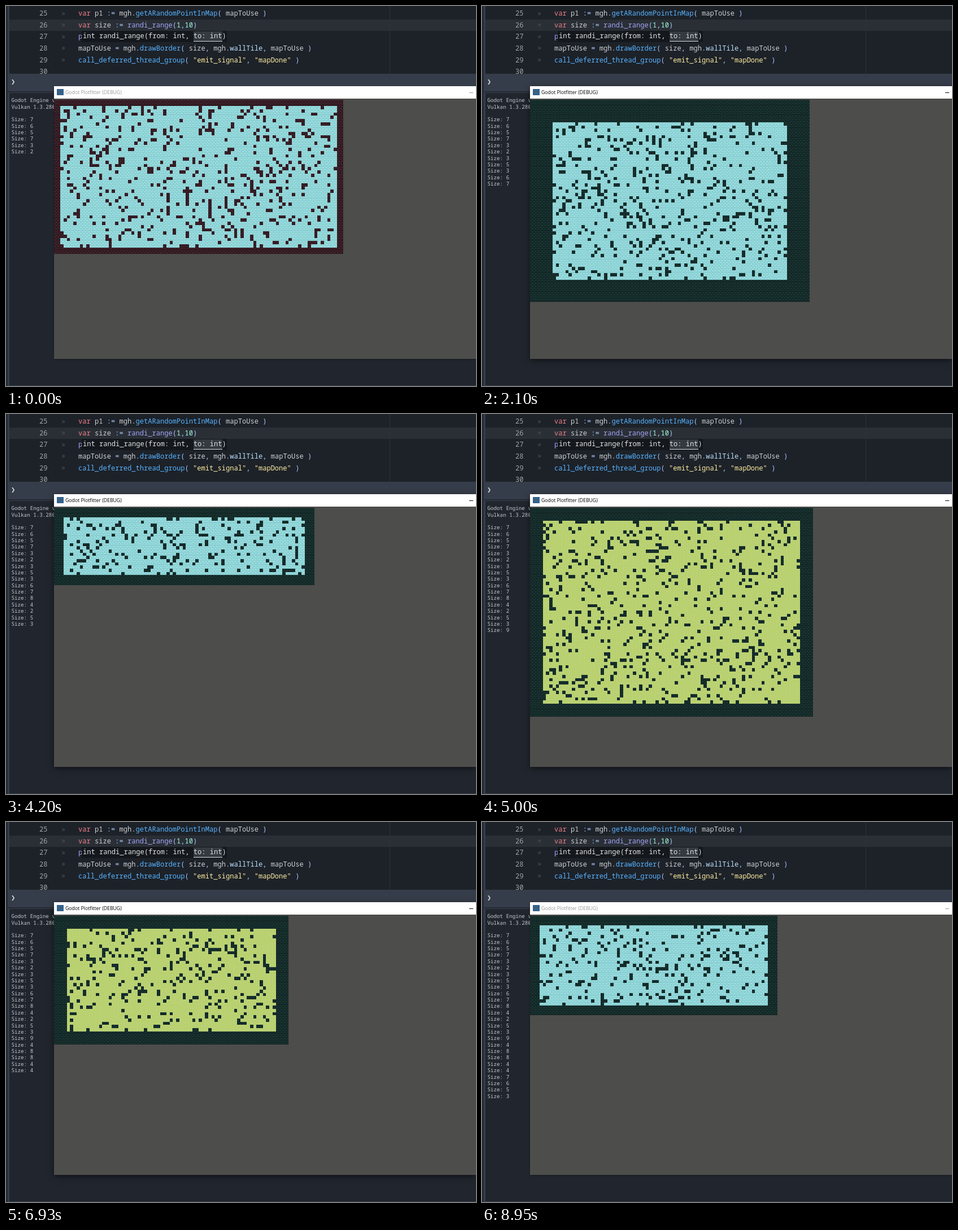
These frames come from a looping animation (832x673 px, 9060 ms). An HTML page with a canvas:

```html
<!DOCTYPE html>
<html lang="en">
<head>
<meta charset="utf-8">
<title>Random map borders</title>
<style>
html, body { margin: 0; width: 100%; height: 100%; overflow: hidden; background: #363d4a; }
#stage { position: relative; width: 832px; height: 673px; overflow: hidden; }
#stage * { position: absolute; margin: 0; }
#stage span { position: static; }
pre { font: 12.08px/20.6px "Noto Sans Mono", "DejaVu Sans Mono", monospace; color: #cdcfd2; white-space: pre; }
#rail { left: 0; top: 0; width: 3px; height: 673px; background: #252a33; }
#editor { left: 6px; top: 0; width: 826px; height: 120px; overflow: hidden; background: #1d2229; }
#current { left: 0; top: 24px; width: 826px; height: 20px; background: #2a2f36; }
#guide { left: 673px; top: 0; width: 1px; height: 120px; background: #2d323a; }
#numbers { left: 53px; top: 3.2px; color: #9fa3a8; }
#tabs { left: 92px; top: 2.5px; color: #4c525b; }
#code { left: 122px; top: 3.2px; }
#hint { left: 128px; top: 44px; width: 257px; height: 20px; background: #14181c; }
#hint i { left: 198px; top: 1px; width: 51px; height: 17px; background: #343a40; border-bottom: 1.5px solid #dfe1e3; }
#hint pre { left: 2px; top: -1px; color: #e0e1e3; }
#prompt { left: 9px; top: 124px; color: #e2e4e7; }
#split { left: 0; top: 151px; width: 832px; height: 2px; background: #252b34; }
#panel { left: 6px; top: 154px; width: 826px; height: 518px; background: #21262e; }
#log { left: 9.5px; top: 161.2px; font-size: 9.22px; line-height: 11.37px; color: #c6c8cb; }
#window { left: 85px; top: 142px; width: 747px; height: 483px; background: #4d4d4b; box-shadow: 0 1px 3px #0006; }
#window.active { box-shadow: 0 3px 11px #0008; }
#title { left: 0; top: 0; width: 747px; height: 22px; background: #fff; color: #999;
  font: 8.7px/22px "Open Sans", "Noto Sans", sans-serif; }
.active #title { color: #000; }
#title b { left: 20px; white-space: pre; font-weight: 400; }
#icon { left: 5px; top: 5px; width: 12px; height: 11px; background: #36618a; }
#dash { left: 735px; top: 10.5px; width: 7px; height: 1px; background: currentColor; }
#map { left: 0; top: 24px; }
.k { color: #f07f83 } .f { color: #57b3ff } .g { color: #a3a3f5 } .n { color: #a1ffe0 }
.s { color: #ffeda1 } .m { color: #bce0ff } .o { color: #abc9ff }
</style>
</head>
<body>
<div id="stage">
  <div id="rail"></div>
  <div id="editor">
    <div id="current"></div><div id="guide"></div>
    <pre id="numbers">25
26
27
28
29
30</pre>
    <pre id="tabs">»
»
»
»
»</pre>
    <pre id="code"><span class="k">var</span> p1 <span class="o">:=</span> mgh<span class="o">.</span><span class="f">getARandomPointInMap</span><span class="o">(</span> mapToUse <span class="o">)</span>
<span class="k">var</span> size <span class="o">:=</span> <span class="g">randi_range</span><span class="o">(</span><span class="n">1</span><span class="o">,</span><span class="n">10</span><span class="o">)</span>
<span class="g">p</span>
mapToUse <span class="o">=</span> mgh<span class="o">.</span><span class="f">drawBorder</span><span class="o">(</span> size<span class="o">,</span> mgh<span class="o">.</span><span class="m">wallTile</span><span class="o">,</span> mapToUse <span class="o">)</span>
<span class="f">call_deferred_thread_group</span><span class="o">(</span> <span class="s">"emit_signal"</span><span class="o">,</span> <span class="s">"mapDone"</span> <span class="o">)</span></pre>
    <div id="hint"><i></i><pre>int randi_range(from: int, to: int)</pre></div>
  </div>
  <pre id="prompt">❯</pre>
  <div id="split"></div>
  <div id="panel"></div>
  <pre id="log"></pre>
  <div id="window">
    <div id="title"><div id="icon"></div><b>Godot Plotfitter (DEBUG)</b><div id="dash"></div></div>
    <canvas id="map" width="747" height="459"></canvas>
  </div>
</div>
<script>
const LOOP = 9060, TILE = 512 / 90;
const $ = id => document.getElementById(id);
const ctx = $('map').getContext('2d');

// Tile colours: [face, joint]
const tiles = {
  red: ['#47252f', '#23141a'],
  green: ['#1b3835', '#0f1f1f'],
  ice: ['#9ee1e3', '#80c6ca'],
  lime: ['#bbd273', '#abc265'],
};

// start, columns, rows, border size, wall, floor, log line appears at once
const maps = [
  [0, 90, 48, 2, 'red', 'ice', 1],
  [500, 100, 65, 3, 'green', 'lime'],
  [900, 76, 67, 5, 'green', 'ice', 1],
  [1300, 83, 25, 3, 'red', 'ice', 1],
  [1600, 86, 71, 6, 'red', 'lime'],
  [2000, 87, 63, 7, 'green', 'ice'],
  [2400, 70, 52, 8, 'red', 'ice'],
  [2800, 93, 70, 4, 'green', 'lime'],
  [3200, 64, 34, 2, 'red', 'lime'],
  [3700, 75, 40, 5, 'green', 'lime', 1],
  [4100, 81, 24, 3, 'green', 'ice'],
  [4500, 72, 69, 9, 'red', 'ice'],
  [5000, 88, 65, 4, 'green', 'lime'],
  [5400, 66, 45, 8, 'red', 'lime'],
  [5910, 75, 55, 8, 'green', 'ice'],
  [6420, 76, 42, 4, 'red', 'ice'],
  [6930, 73, 40, 4, 'green', 'lime', 1],
  [7440, 58, 36, 7, 'red', 'ice', 1],
  [7840, 63, 34, 6, 'green', 'lime', 1],
  [8240, 70, 64, 5, 'red', 'lime'],
  [8740, 77, 31, 3, 'green', 'ice', 1],
];
const earlier = [7, 6, 5, 7, 3];

function seeded(seed) {
  return () => {
    seed = seed + 0x6D2B79F5 | 0;
    let r = Math.imul(seed ^ seed >>> 15, 1 | seed);
    r = r + Math.imul(r ^ r >>> 7, 61 | r) ^ r;
    return ((r ^ r >>> 14) >>> 0) / 4294967296;
  };
}

function drawTile(kind, col, row) {
  const [face, joint] = tiles[kind];
  const x = Math.round(col * TILE), y = Math.round(row * TILE);
  const w = Math.round((col + 1) * TILE) - x, h = Math.round((row + 1) * TILE) - y;
  ctx.fillStyle = face;
  ctx.fillRect(x, y, w, h);
  ctx.fillStyle = joint;
  if (kind === 'lime') {
    ctx.fillRect(x + 1, y + 1, 1, 1);
    ctx.fillRect(x + 3, y + 4, 1, 1);
    return;
  }
  ctx.fillRect(x, y + 2, w, 1);
  ctx.fillRect(x, y + h - 1, w, 1);
  ctx.fillRect(x + 1, y, 1, 2);
  ctx.fillRect(x + 4, y + 3, 1, 2);
}

function drawMap(index) {
  const [, cols, rows, size, wall, floor] = maps[index];
  const random = seeded(index * 977 + 5);
  ctx.clearRect(0, 0, 747, 459);
  for (let row = 0; row < rows; row++) {
    for (let col = 0; col < cols; col++) {
      const edge = Math.min(col, row, cols - 1 - col, rows - 1 - row) < size;
      drawTile(edge || random() < 0.145 ? wall : floor, col, row);
    }
  }
}

let shownMap = -1, shownLines = 0;

function frame() {
  const t = performance.now() % LOOP;
  const index = maps.findLastIndex(m => m[0] <= t);
  if (index !== shownMap) drawMap(shownMap = index);

  const logged = maps.filter(m => t >= m[0] + (m[6] ? 0 : 100));
  if (logged.length !== shownLines) {
    shownLines = logged.length;
    const sizes = [...earlier, ...logged.map(m => m[3])];
    $('log').textContent = 'Godot Engine v4\nVulkan 1.3.280\n\n' + sizes.map(s => 'Size: ' + s).join('\n');
  }
  $('window').classList.toggle('active', t >= 300 && t < 8950);
  requestAnimationFrame(frame);
}
frame();
</script>
</body>
</html>
```
